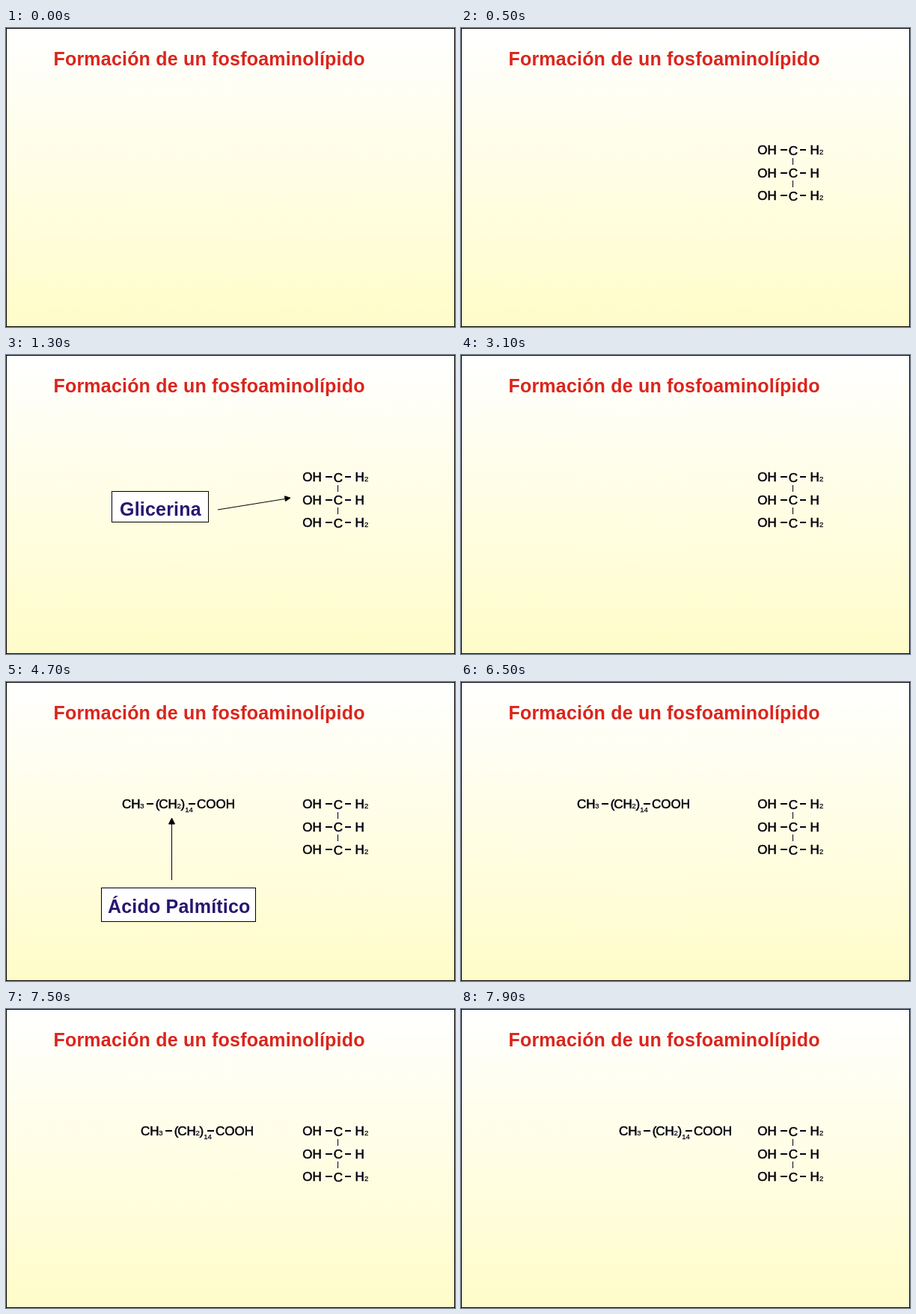
Write an HTML page that moves like this. It is 600 px wide and 400 px high and loops after 8 s.

```html
<!DOCTYPE html>
<html lang="es">
<head>
<meta charset="utf-8">
<title>Formación de un fosfoaminolípido</title>
<style>
html, body { margin: 0; width: 100%; height: 100%; overflow: hidden; }
svg { display: block; width: 600px; height: 400px; font-family: "Liberation Sans", Arial, sans-serif; }
text { white-space: pre; }
.big { font-size: 25px; font-weight: bold; letter-spacing: .2px; }
.title { fill: #da251d; }
.label { fill: #28166f; }
.box { fill: #fff; stroke: #000; }
.chem { font-size: 17px; fill: #04020f; stroke: #04020f; stroke-width: .55px; }
.chem .sub { font-size: 9.5px; stroke-width: .25px; }
.chem path { fill: none; stroke-width: 2px; }
.chem .thin { stroke-width: 1px; }
.arrow path { stroke: #000; }

#glycerol, #glyLabel, #acid, #acidLabel { animation: 8s step-end infinite; }
#glycerol { animation-name: glycerol; }
#glyLabel { animation-name: glyLabel; }
#acid { animation-name: acid; }
#acidLabel { animation-name: acidLabel; }
#slide { animation: slide 8s step-end infinite; }

@keyframes glycerol { 0% { opacity: 0 } 6.25%, 100% { opacity: 1 } }
@keyframes glyLabel { 0% { opacity: 0 } 16.25% { opacity: 1 } 38.75%, 100% { opacity: 0 } }
@keyframes acid { 0% { opacity: 0 } 48.75%, 100% { opacity: 1 } }
@keyframes acidLabel { 0% { opacity: 0 } 58.75% { opacity: 1 } 81.25%, 100% { opacity: 0 } }
@keyframes slide {
  0% { transform: translateX(0) }
  91.25% { transform: translateX(10px) }
  93.75% { transform: translateX(25px) }
  96.25% { transform: translateX(41px) }
  98.75%, 100% { transform: translateX(56px) }
}
</style>
</head>
<body>
<svg viewBox="0 0 600 400">
  <defs>
    <linearGradient id="paper" x2="0" y2="1">
      <stop stop-color="#fff"/>
      <stop offset="1" stop-color="#fffcc9"/>
    </linearGradient>
  </defs>
  <rect x=".5" y=".5" width="599" height="399" fill="url(#paper)" stroke="#000"/>
  <text class="big title" x="63.5" y="50">Formación de un fosfoaminolípido</text>

  <g id="glycerol" class="chem">
    <text x="396.2" y="169">OH</text><text x="437.8" y="170">C</text><text x="466.5" y="169">H</text>
    <text x="396.2" y="200">OH</text><text x="437.8" y="200">C</text><text x="466.5" y="200">H</text>
    <text x="396.2" y="230">OH</text><text x="437.8" y="231">C</text><text x="466.5" y="230">H</text>
    <text class="sub" x="479" y="169">2</text><text class="sub" x="479" y="230">2</text>
    <path d="M427 163h9m17 0h8M427 194h9m17 0h8M427 224h9m17 0h8"/>
    <path class="thin" d="M443.5 174v9m0 21v9"/>
  </g>

  <g id="glyLabel">
    <rect class="box" x="141.5" y="182.5" width="129" height="41"/>
    <text class="big label" x="152" y="215">Glicerina</text>
    <g class="arrow">
      <path d="M283 207L374 192.3"/>
      <path d="M380 191.2L372.5 188.8L373.4 195.6Z" stroke="none"/>
    </g>
  </g>

  <g id="acid">
    <g id="slide" class="chem">
      <text x="155" y="169">CH</text><text class="sub" x="179.3" y="169">3</text>
      <text x="199.8" y="169">(</text><text x="204.2" y="169">CH</text><text class="sub" x="228.5" y="169">2</text>
      <text x="233.5" y="169">)</text><text class="sub" x="239.2" y="174">14</text>
      <text x="255" y="169">COOH</text>
      <path d="M188 163h9m47 0h9"/>
    </g>
  </g>

  <g id="acidLabel">
    <rect class="box" x="127.5" y="275.5" width="206" height="45"/>
    <text class="big label" x="136" y="309">Ácido Palmítico</text>
    <g class="arrow">
      <path d="M221.5 265V188"/>
      <path d="M221.5 182L225.5 190H217.5Z" stroke="none"/>
    </g>
  </g>
</svg>
</body>
</html>
```
